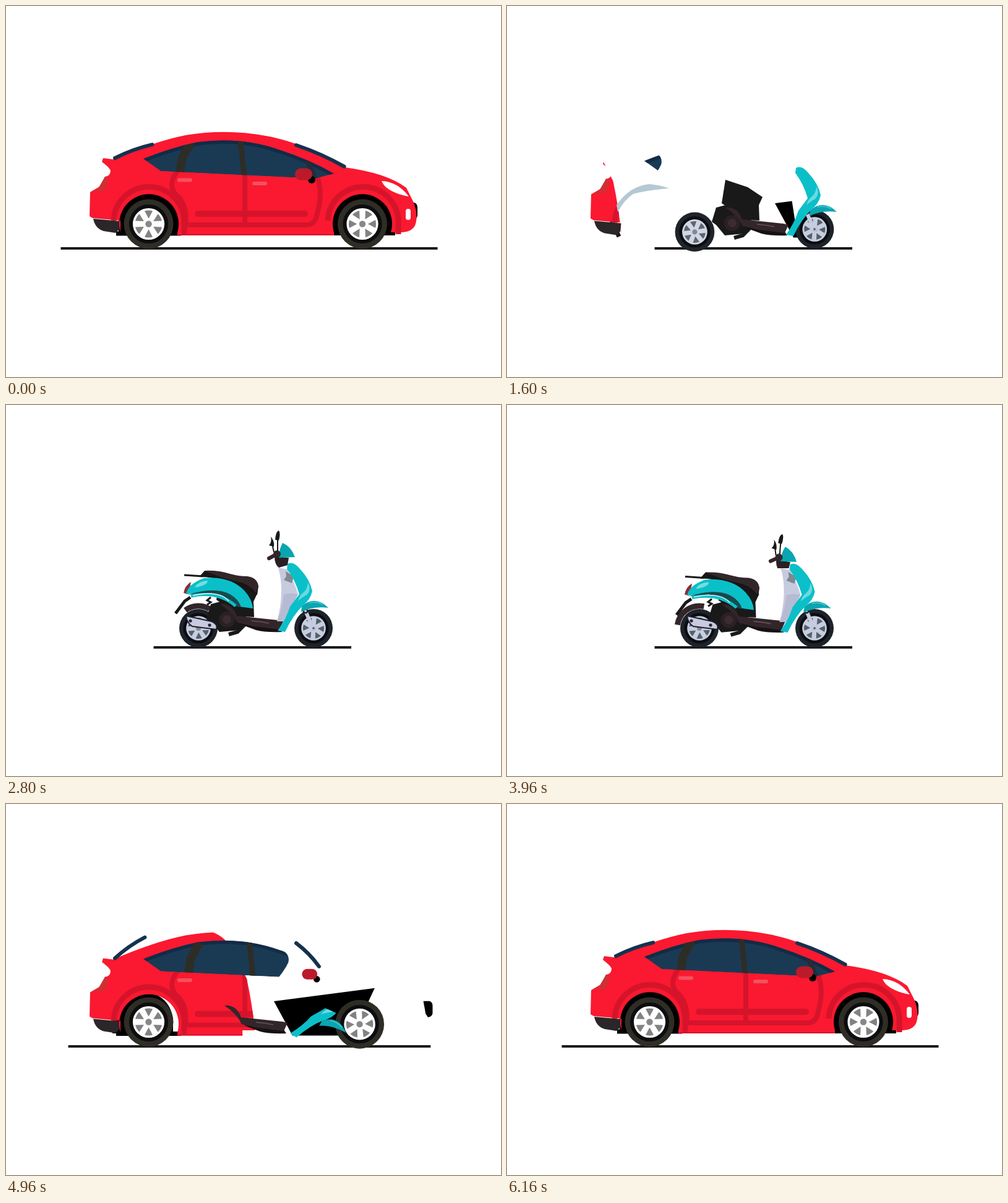
An HTML page with a canvas for the animation above (6200 ms loop, 800x600 px).

```html
<!DOCTYPE html>
<html lang="en">
<head>
<meta charset="utf-8">
<title>Car to scooter</title>
<style>
html, body { margin: 0; width: 100%; height: 100%; overflow: hidden; background: #fff; }
canvas { display: block; }
</style>
</head>
<body>
<canvas id="stage" width="800" height="600"></canvas>
<script>
const g = document.getElementById('stage').getContext('2d');
const LOOP = 6200, MIRROR = 6180, TAU = Math.PI * 2;
const RED = '#fa1930', TRIM = '#d5142b', GLASS = '#1a3a54', NAVY = '#15324e';
const TEAL = '#0bbfc9', DEEP = '#0aa5b0', BROWN = '#33262b', INK = '#191919', SILVER = '#c7cbe0';

// timing
const span = (u, a, b) => Math.min(1, Math.max(0, (u - a) / (b - a)));
const smooth = (u, a, b) => { const p = span(u, a, b); return p * p * (3 - 2 * p); };
const rush = (u, start, length, power) => Math.max(0, (u - start) / length) ** power;
const lerp = (a, b, p) => a + (b - a) * p;
const mix = (a, b, p) => `rgb(${a.map((v, i) => Math.round(lerp(v, b[i], p)))})`;

// drawing
const fill = (d, c) => { g.fillStyle = c; g.fill(new Path2D(d)); };
const line = (d, c, w, cap = 'butt') => {
  g.strokeStyle = c; g.lineWidth = w; g.lineCap = cap; g.stroke(new Path2D(d));
};
const dot = (x, y, r, c) => { g.fillStyle = c; g.beginPath(); g.arc(x, y, r, 0, TAU); g.fill(); };
const group = (fn, clip) => {
  g.save();
  if (clip) g.clip(new Path2D(clip));
  fn();
  g.restore();
};
const rod = (x, y, degrees, length) => group(() => {
  g.translate(x, y);
  g.rotate(degrees * Math.PI / 180);
  line(`M0 0Q${length / 2} -4 ${length} 0`, NAVY, 6, 'round');
});

function wheel(x, y, r, turn, light) {
  const p = span(r, 40, 31);
  const rim = mix([255, 255, 255], [199, 205, 224], light);
  dot(x, y, r, mix([47, 45, 37], [29, 35, 43], p));
  dot(x, y, r * .79, '#0b0d0f');
  dot(x, y, r * .64, rim);
  g.fillStyle = mix([130, 130, 130], [82, 98, 106], light);
  for (let i = 0; i < 6; i++) {
    const a = turn + i * TAU / 6;
    g.beginPath();
    g.moveTo(x + Math.cos(a) * r * .22, y + Math.sin(a) * r * .22);
    g.arc(x, y, r * .55, a - .3, a + .3);
    g.fill();
  }
  dot(x, y, r * .19, rim);
  dot(x, y, r * .13, '#85888c');
}

// Each wheel dips below the straight path while it shrinks.
function rollingWheel(from, to, p, turn) {
  const x = lerp(from, to, p);
  const y = lerp(352.5, 361, p) + 18 * Math.sin(Math.PI * p);
  wheel(x, y, lerp(40, 31, p), turn + (x - from) / 80, p * p);
}

function wheels(u, back) {
  rollingWheel(230.5, 311, smooth(u, 1220, 1690), TAU / 4);
  rollingWheel(576, 497, smooth(u, back ? 1150 : 800, 1630), 0);
}

function ground(u) {
  const p = Math.min(1, rush(u, 1000, 600, 2.5));
  g.fillStyle = INK;
  g.fillRect(88.5 + 150 * p, 390, 609 - 289.5 * p, 4);
}

// car
const archHole = x => `H${x + 46}V366A48 48 0 1 0 ${x - 46} 366`;
const archFill = x => fill(`M${x - 49} 371V352A49 49 0 0 1 ${x + 49} 352V371Z`, '#000');

function carBody(u) {
  archFill(576);
  line('M612 367H629', '#000', 8);
  fill('M157 246L173 248Q240 219 290 209Q355 198 420 210C470 219 510 240 548 261Q615 270 647 294L659 318' +
    'Q667 340 661 355Q655 366 638 366' + archHole(576) + 'V371' + archHole(231) +
    'V347L140 343L135 340L136 301L153 291L160 276Q169 275 169 266Q167 261 155 252Z', RED);
  fill('M141 300L149 295L160 276L166 279L159 299Z', '#cf3033');
  for (const x of [231, 577]) line(`M${x - 57} 347A57 57 0 0 1 ${x + 57} 352V369`, TRIM, 9);
  line('M281 262Q256 291 279 309Q293 325 290 354H486Q500 354 503 335Q515 295 497 262M386 270V354', TRIM, 8);
  line('M310 336H483', TRIM, 10, 'round');
  line('M278 370H528', TRIM, 2);
  fill('M607 283Q633 284 651 308L645 307Q613 299 607 283Z', '#fff');
  line('M650 332V342', '#fff', 8, 'round');
  for (const x of [279, 400]) {
    if (x < 400 || u < 960) line(`M${x + 1} ${x * .045 + 269}h18`, '#f4515f', 6, 'round');
  }
}

function carGlass(u) {
  const top = 'M222 247Q270 228 310 220Q380 211 440 232Q490 248 530 271';
  group(() => {
    fill(top + 'L500 279L250 267Z', GLASS);
    line(top, '#122b47', 11);
    g.translate(14 * smooth(u, 850, 1060), 0);
    line('M298 221L284 248L281 270', '#2d2d28', 14);
    line('M379 216L385 276', '#2d2d28', 9);
    line('M487 250L499 278', '#232c38', 8);
  }, top + 'L500 279L250 267Z');
}

function car(u) {
  const edge = 1097 - .57 * u;
  const pane = 530 - 280 * rush(u, 900, 700, 1.7);
  const drop = 3.5 * smooth(u, 750, 1000);

  // front bumper insert
  const out = 33 * smooth(u, 40, 340) - 33 * rush(u, 900, 500, 3);
  const size = 1 - rush(u, 900, 500, 6);
  if (size > 0) group(() => {
    g.translate(665 + out, 330); g.scale(size, size);
    fill('M-16 -12H-5Q0 -10 0 -4V9Q-1 15 -8 16L-12 10Z', '#000');
  });

  // front frame
  const tip = 640 - 179 * rush(u, 900, 700, 1.78);
  const low = 371 + drop;
  if (tip > 433) fill(`M433 319L${tip} ${319 - (tip - 433) * .13}L${470 + (tip - 461) * .67} ${low}H463Z`, '#000');

  if (edge > 130) {
    group(() => {
      if (u < 1400) archFill(231 - 10 * smooth(u, 850, 1080));
      if (u < 1400) line(`M178 ${low - 3}H283`, '#000', 7);
      else line('M168 344L181 373', INK, 7);
      g.translate(0, drop);
      fill('M141 344L185 348L183 361L177 367L158 364Q144 360 141 344Z', '#2b2629');
    }, `M0 0H${Math.max(edge, 290 * (u < 1400))}V600H0Z`);
    group(() => {
      g.translate(0, drop);
      carBody(u);
    }, edge > 690 ? '' : `M0 ${284 * smooth(u, 1350, 1600)}H${edge - 75}V205Q${edge - 50} 212 ${edge - 38} 233` +
      `L${edge - 13} 283Q${edge - 4} 325 ${edge} 366H${edge - 20}V600H0Z`);
  }

  if (pane > 222) group(() => {
    g.translate(0, drop);
    carGlass(u);
  }, u < 900 ? '' : `M0 0H${pane - 24}V232Q${pane + 4} 238 ${pane} 256Q${pane - 6} 270 ${pane - 24} 290H0Z`);

  // rear and front screens swing on one end, then shrink away
  const hatch = span(u, 600, 1400), screen = span(u, 700, 1330);
  if (hatch < 1) rod(176, 246 + drop, -20 - 23 * Math.sin(Math.PI * hatch), 64 * (1 - hatch ** 10));
  if (screen < 1) rod(469, 225, 24 + 57 * screen ** 5, 85 * (1 - screen ** 5));

  // side mirror
  const swing = span(u, 800, 1400);
  group(() => {
    g.translate(481 + 12 * Math.sin(Math.PI * swing), 272 + 4 * Math.sin(Math.PI * swing));
    g.scale(1 - swing ** 6, 1 - swing ** 6);
    dot(13, 9, 6, '#000');
    line('M-4.5 0H4.5', '#bb1a2b', 19, 'round');
  });
}

// scooter
function engine(u, settle) {
  const s = smooth(u, 1350, 1560);
  group(() => {
    g.translate(7 * settle, 4 * settle);
    group(() => {
      g.translate(357, 346); g.scale(s, s); g.translate(-357, -346);
      fill('M346 277L382 289L406 305L400 318L401 343L380 342L340 315Z', INK);
      fill('M324 345L331 322L346 318L372 326L390 345L378 364L345 367L331 350Z', INK);
      line('M388 353L374 367L360 371', INK, 6);
    });
    group(() => {
      fill('M372 350L404 357L442 361L446 367Q420 368 404 364L385 357Z', '#151213');
      fill('M346 322Q365 320 373 341L440 348L448 350L442 363L400 358L374 352Q366 335 346 322Z', BROWN);
      line('M397 349Q412 350 425 353', '#665258', 1.6);
    }, `M${lerp(455, 330, span(u, 1200, 1550))} 200H600V420H0Z`);
    if (s > .9) { dot(357, 347, 13, '#2b2023'); dot(357, 347, 7, '#3c2b31'); }
  });
}

function exhaust(u) {
  const p = smooth(u, 1750, 2100);
  group(() => {
    g.globalAlpha = p;
    g.translate(-30 * (1 - p), 0);
    const pipe = 'M291 341L332 350Q343 354 340 363L301 358Q292 352 291 341Z';
    fill(pipe, SILVER);
    line(pipe, '#20202a', 2);
    dot(298, 349, 2.6, '#252731');
    dot(329, 356, 2.6, '#252731');
  });
}

function mudguard(u) {
  const turn = 1.5 * (1 - smooth(u, 1900, 2560));
  g.strokeStyle = BROWN;
  g.lineWidth = 9;
  g.beginPath();
  g.arc(311, 361, 36, -2.2 - turn, -1.05 - turn * .4);
  g.stroke();
}

function tail(u, settle) {
  const p = smooth(u, 1640, 1950);
  if (p) group(() => {
    g.globalAlpha = p;
    g.translate(-100 * (1 - p), 12 * settle);
    line('M298 311L289 317L274 337', INK, 5);
    line('M331 311L325 316L331 319L325 323', INK, 3);
    fill('M287 304Q289 292 299 286L295 306Z', '#8a2c37');
    // seat
    line('M288 275L318 277', INK, 3);
    fill('M312 278L321 268L370 275L408 293L406 307Q386 296 360 286Q335 278 312 278Z', '#171515');
    fill('M321 268Q343 267 362 273Q375 277 390 277Q406 279 408 293L404 304Q393 288 368 284Q346 279 321 268Z', BROWN);
    // fairing
    fill('M291 306Q293 290 320 280Q362 276 385 300Q398 314 399 329L370 325Q355 305 325 303Z', TEAL);
    fill('M294 307Q337 293 362 306Q376 314 380 327L368 325Q355 306 325 304Z', '#174a4f');
    line('M299 309Q342 300 371 325', TEAL, 5);
    line('M302 308Q345 299 360 317', '#e4f7f8', 1.3);
    fill('M305 295Q310 285 326 284Q326 292 305 295Z', '#72dde2');
  });
}

// pale rim that passes before the fairing arrives
function crescent(u) {
  const width = 92 * Math.sin(Math.PI * span(u, 1480, 1720));
  group(() => fill('M177 322Q198 291 230 288Q250 290 262 295Q225 298 204 304Q190 313 179 333Z', '#b5c9d4'),
    `M170 200h${width}v200h${-width}Z`);
}

function fork(u) {
  group(() => {
    g.globalAlpha = span(u, 1500, 1600);
    line('M484 333L496 361', SILVER, 6, 'round');
    dot(484, 333, 4.5, '#22252c');
    dot(484, 333, 2, SILVER);
    dot(497, 361, 4, SILVER);
    dot(497, 361, 2, '#5f6b75');
  });
}

function headset(u, settle) {
  if (u > 1750) group(() => {
    g.translate(445, 260 + 28 * settle);
    g.rotate(.35 * settle);
    g.translate(-445, -260);
    line('M439 240V214M433 238L430 224', INK, 2);
    fill('M435 218Q436 204 441 203Q444 208 441 219Z', INK);
    fill('M428 213Q434 220 433 229L425 227Q430 222 428 213Z', INK);
    fill('M434 245L457 247L455 259L441 263Q434 258 434 245Z', '#2a2023');
    fill('M447 223Q461 229 467 246L441 247Q441 234 447 223Z', DEEP);
    line('M425 248L438 241', BROWN, 6, 'round');
    dot(438, 241, 6, BROWN);
  }, 'M380 190H500V264H380Z');
}

function shield(u, settle) {
  const p = span(u, 1000, 1600);
  group(() => {
    g.translate(445 + 12 * settle + 11 * (1 - p), 367 + 5 * settle + 5 * (1 - p));
    g.rotate(.65 * (1 - p));
    g.translate(-445, -366);
    g.clip(new Path2D(`M400 ${366 - 170 * p}H540V380H400Z`));
    fill('M478 324Q500 306 521 327Q495 324 477 334Z', DEEP);
    line('M490 319Q503 316 512 322', '#35c4cc', 2);
    group(() => {
      fill('M440 262L455 265Q466 285 472 305L448 349H438Q451 300 440 262Z', SILVER);
      fill('M449 306Q455 302 472 305L448 349H438Q446 330 449 306Z', '#b6bbd3');
      fill('M452 268L465 276L462 287L449 282L453 276Z', '#7f888e');
    }, `M400 ${lerp(350, 255, span(u, 1640, 1950))}H520V350H400Z`);
    fill('M455 256Q464 251 475 264Q491 281 495 300Q492 314 480 323Q463 340 451 366L439 364Q453 344 459 325L474 305Q468 283 454 264Z', TEAL);
    fill('M488 286Q494 298 486 306Q477 311 472 316Q475 306 481 302Q487 297 488 286Z', '#68dbe0');
  });
}

function draw(t) {
  const back = t > MIRROR / 2;
  const u = Math.max(0, back ? MIRROR - t : t);
  const settle = (1 - span(u, 1600, 2750)) ** 2;
  g.fillStyle = '#fff';
  g.fillRect(0, 0, 800, 600);
  ground(u);
  car(u);
  wheels(u, back);
  if (u > 1900) mudguard(u);
  if (u > 1200) engine(u, settle);
  exhaust(u);
  crescent(u);
  tail(u, settle);
  fork(u);
  headset(u, settle);
  if (u > 1000) shield(u, settle);
}

const start = performance.now();
function tick() {
  draw((performance.now() - start) % LOOP);
  requestAnimationFrame(tick);
}
tick();
</script>
</body>
</html>
```
